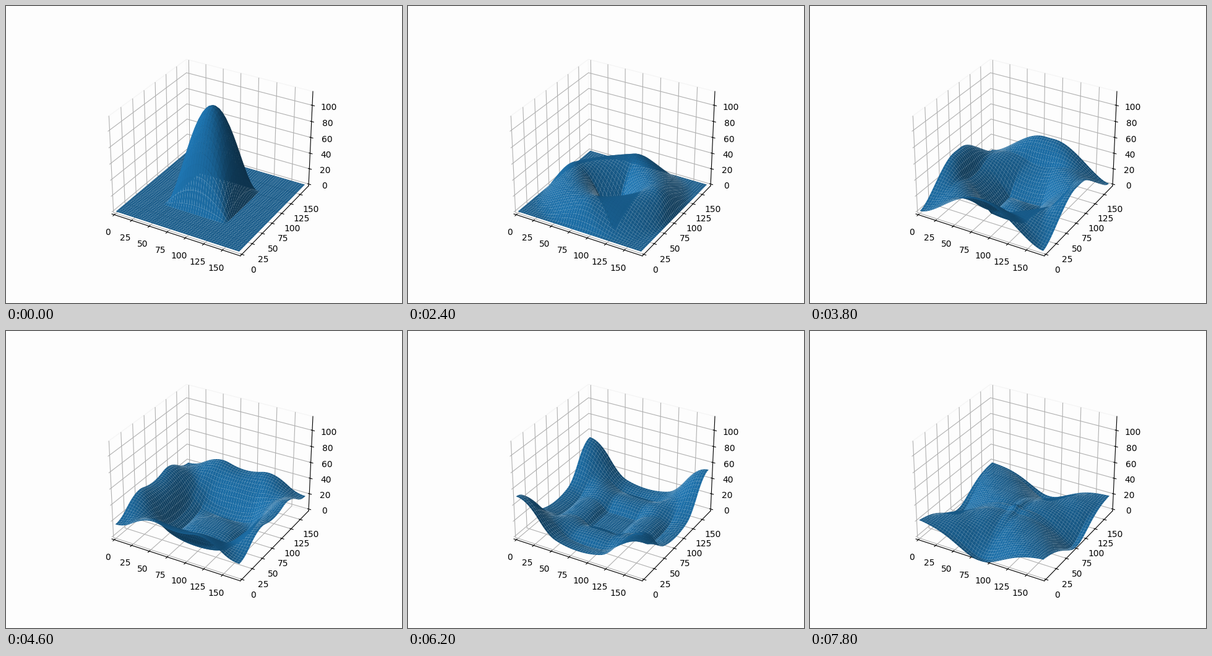
These frames come from a looping animation (640 by 480 pixels, 8 s). A matplotlib script:

```python
import numpy as np
import matplotlib.pyplot as plt
from matplotlib.animation import FuncAnimation

SIDE = 170        # edge length of the square membrane
PEAK = 114.5      # height of the initial bump
HALF = 0.25       # half width of the bump, in sides
CENTER = (0.5, 0.505)
SPEED = 0.0202    # wave speed, sides per frame
DAMPING = 0.0192  # decay rate per frame
FRAMES = 40
PAPER = "#fdfdfd"
MARGIN = 1 / 48

kappa = np.pi * np.arange(240)


def cosine_series(center):
    """Cosine coefficients of a parabolic arch over [center - HALF, center + HALF]."""
    q = kappa[1:]
    t = q * HALF
    arch = 8 * (np.sin(t) - t * np.cos(t)) / (HALF**2 * q**3)
    return np.append(4 * HALF / 3, arch * np.cos(q * center))


u = np.linspace(0, 1, 50)
X, Y = np.meshgrid(u * SIDE, u * SIDE)
basis = np.cos(np.outer(u, kappa))
weights = PEAK * np.outer(cosine_series(CENTER[1]), cosine_series(CENTER[0]))
omega0 = SPEED * np.hypot(kappa[:, None], kappa)
omega = np.sqrt(np.maximum(omega0**2 - DAMPING**2, 1e-12))


def height(n):
    """Damped membrane with reflecting edges, released at rest."""
    swing = np.cos(omega * n) + DAMPING / omega * np.sin(omega * n)
    swing *= np.exp(-DAMPING * n)
    swing[0, 0] = 1
    return basis @ (weights * swing) @ basis.T


fig = plt.figure(figsize=(6.4, 4.8), dpi=100, facecolor=PAPER)
ax = fig.add_subplot(projection="3d", facecolor=PAPER)
ax.set_xlim(0, SIDE, view_margin=MARGIN)
ax.set_ylim(0, SIDE, view_margin=MARGIN)
ax.set_zlim(0, PEAK, view_margin=MARGIN)
for axis in (ax.xaxis, ax.yaxis, ax.zaxis):
    axis.set_pane_color(PAPER)
    axis.pane.set_edgecolor("#f5f5f5")


def draw(n):
    for old in list(ax.collections):
        old.remove()
    return [ax.plot_surface(X, Y, height(n), color="C0")]


anim = FuncAnimation(fig, draw, frames=FRAMES, interval=200, repeat=True)
plt.show()
```
